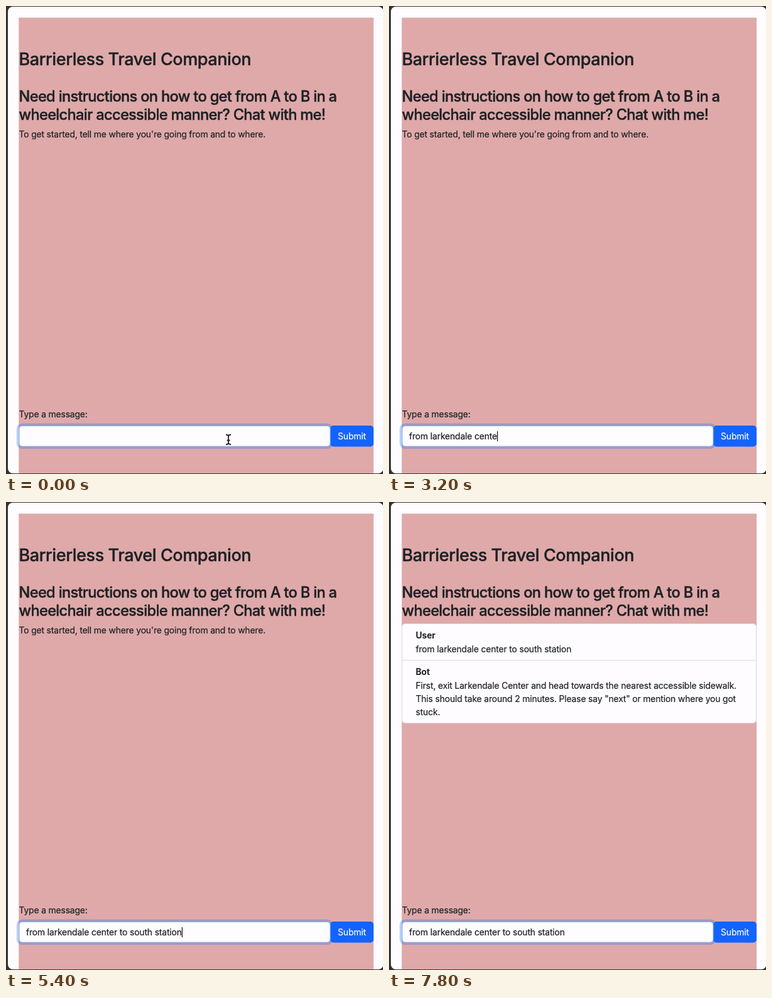
An HTML page that plays this animation: 600x744 px, repeating every 8 s.

```html
<!DOCTYPE html>
<html lang="en">
<head>
<meta charset="utf-8">
<title>Journey chat</title>
<style>
  html, body { margin: 0; width: 100%; height: 100%; overflow: hidden; background: #333133; }
  svg { display: block; }
  text {
    font: 13.85px Inter, "Open Sans", sans-serif;
    font-optical-sizing: none;
    letter-spacing: -.13px;
    white-space: pre;
    fill: #1d2024;
    stroke: #1d2024;
    stroke-width: .2px;
  }
  .title, .lead { font-weight: 500; stroke-width: .4px; }
  .title { font-size: 27px; letter-spacing: -.41px; }
  .lead { font-size: 23.6px; letter-spacing: -.66px; }
  .name { font-weight: 700; stroke: none; }
  .submit { fill: #fff; stroke: #fff; text-anchor: middle; }
</style>
</head>
<body>
<svg width="600" height="744" viewBox="0 0 600 744">
  <rect x="3" y="1" width="597.5" height="742" rx="8" fill="#fefcfe"/>
  <rect x="20.3" y="18.5" width="564.7" height="724.5" fill="#dfa9a9"/>

  <text class="title" x="20.5" y="94">Barrierless Travel Companion</text>
  <text class="lead" x="20.5" y="151.5">Need instructions on how to get from A to B in a</text>
  <text class="lead" x="20.5" y="181">wheelchair accessible manner? Chat with me!</text>

  <text id="hint" x="20.5" y="209">To get started, tell me where you're going from and to where.</text>
  <circle id="spinner" cx="34.8" cy="242.8" r="12.5" fill="none" stroke="#212529" stroke-width="3.6"
    pathLength="360" stroke-dasharray="270 90" stroke-dashoffset="-45"/>

  <g id="chat">
    <rect x="20.5" y="193.5" width="564" height="158" rx="5" fill="#fefcfe" stroke="#d9d6da"/>
    <path d="M21 251.5H584" stroke="#d9d9dd"/>
    <text class="name" x="42.5" y="217">User</text>
    <text id="request" x="42.5" y="238.5"></text>
    <text class="name" x="42.5" y="275">Bot</text>
    <text x="42.5" y="296.5">First, exit Larkendale Center and head towards the nearest accessible sidewalk.</text>
    <text x="42.5" y="318">This should take around 2 minutes. Please say "next" or mention where you got</text>
    <text x="42.5" y="339">stuck.</text>
  </g>

  <text x="20.5" y="654">Type a message:</text>
  <rect x="516" y="667" width="69" height="33.5" rx="5" fill="#1463fc"/>
  <text class="submit" x="550.5" y="689">Submit</text>
  <rect x="18.7" y="665.2" width="499.6" height="37" rx="7" fill="none"
    stroke="#0d6efd" stroke-opacity=".3" stroke-width="3.6"/>
  <rect x="21" y="667.5" width="495" height="32.5" rx="5" fill="#fefcfe" stroke="#86b0f5"/>
  <text id="typed" x="32" y="689"></text>
  <rect id="caret" y="676" width="1.2" height="16" fill="#111"/>

  <defs>
    <path id="beam" fill="none"
      d="M350 681.5Q354 681.5 354 684.5Q354 681.5 358 681.5M354 684V694M350 697Q354 697 354 694Q354 697 358 697M351.5 690.5H356.5"/>
  </defs>
  <g id="pointer">
    <use href="#beam" stroke="#fff" stroke-width="3.6" stroke-linecap="square"/>
    <use href="#beam" stroke="#222" stroke-width="1.8"/>
  </g>
</svg>
<script>
  const LOOP = 8000, SUBMIT = 5550, REPLY = 6550, TYPING_END = 5200;
  const MESSAGE = "from larkendale center to south station";
  const get = id => document.getElementById(id);
  const [hint, spinner, chat, typed, caret, pointer] =
    ["hint", "spinner", "chat", "typed", "caret", "pointer"].map(get);
  const show = (el, on) => { el.style.display = on ? "" : "none"; };

  get("request").textContent = MESSAGE;

  function draw(t) {
    // Steady typing at 9.3 characters per second
    const count = Math.max(0, Math.min(MESSAGE.length, Math.floor(14.4 + (t - 2400) * .0093)));
    typed.textContent = MESSAGE.slice(0, count);
    caret.setAttribute("x", 32 + (count ? typed.getComputedTextLength() : 0));

    const typing = count > 0 && t < TYPING_END;
    show(caret, typing || (t + 800) % 1000 < 500);
    show(pointer, count === 0);

    show(hint, t < REPLY);
    show(chat, t >= REPLY);
    show(spinner, t >= SUBMIT && t < REPLY);
    spinner.setAttribute("transform", `rotate(${(t - SUBMIT) / 750 * 360} 34.8 242.8)`);
  }

  function tick() {
    draw(performance.now() % LOOP);
    requestAnimationFrame(tick);
  }
  tick();
</script>
</body>
</html>
```
